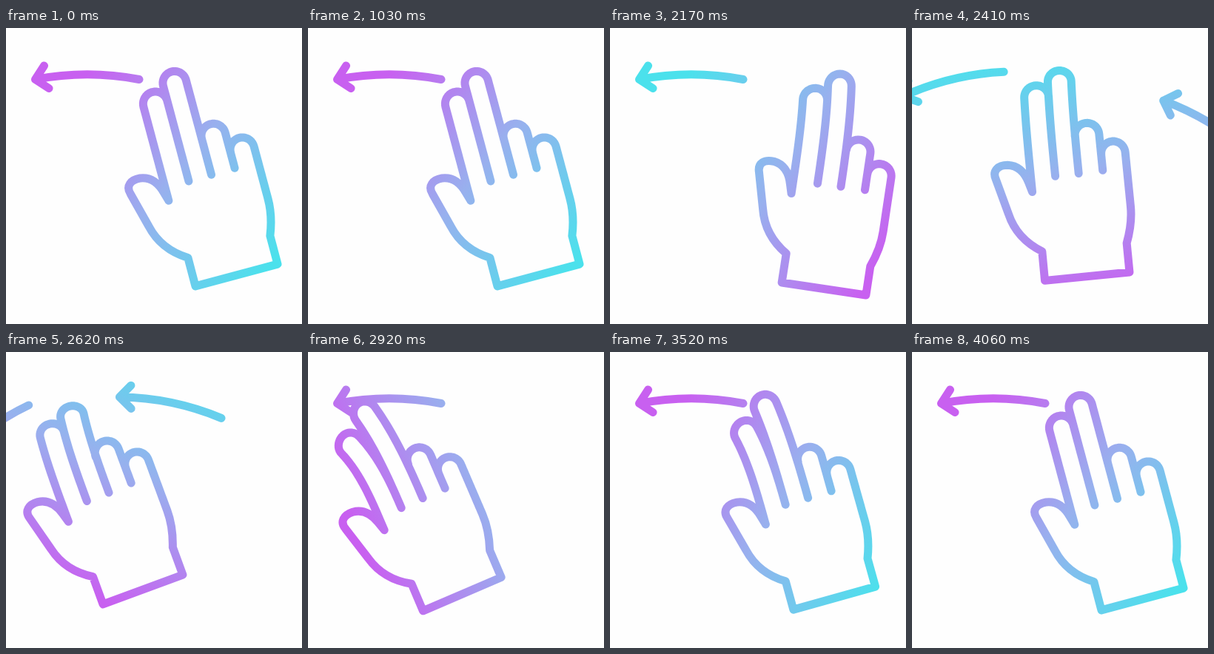
Animation, 400 px wide and 400 px high, one loop 4.09 s. Source, as an HTML page with a canvas:

```html
<!DOCTYPE html>
<html lang="en">
<head>
<meta charset="utf-8">
<title>Swipe left</title>
<style>
html, body { margin: 0; height: 100%; overflow: hidden; background: #fefefe; }
canvas { display: block; width: 100vw; height: 100vh; }
</style>
</head>
<body>
<canvas id="stage" width="400" height="400"></canvas>
<script>
const ctx = document.getElementById('stage').getContext('2d');
const LOOP = 4090, START = 1030, END = 4060, STEP = 30;

// Key poses: time, wrist x, wrist y, tilt, finger curl, extra index curl
const POSES = [
  [START, 311.5, 334, -15, 0, 0],
  [1690, 300.5, 364, 8.1, -20, 0],
  [2170, 289, 352.5, 8.5, -7, 0],
  [2620, 185, 321, -20.3, 10, 0],
  [2760, 176, 324, -23.5, -2, -4],
  [3160, 261, 331, -21.3, -22, -30],
  [3700, 316, 333, -13.5, 0, 0],
  [END, 311.5, 334, -15, 0, 0]
];

const rad = deg => deg * Math.PI / 180;
const lerp = (a, b, u) => a + (b - a) * u;
const progress = (t, from, to) => Math.min(1, Math.max(0, (t - from) / (to - from)));

// Smooth curve through the poses, at rest at both ends
function poseAt(t) {
  let i = 0;
  while (i < POSES.length - 2 && t >= POSES[i + 1][0]) i++;
  const a = POSES[i], b = POSES[i + 1], span = b[0] - a[0];
  const u = progress(t, a[0], b[0]);
  const slope = (j, c) => {
    const p = POSES[j - 1], n = POSES[j + 1];
    return p && n ? (n[c] - p[c]) / (n[0] - p[0]) * span : 0;
  };
  return a.slice(1).map((v, k) => {
    const c = k + 1, d = b[c] - v, m0 = slope(i, c), m1 = slope(i + 1, c);
    return v + u * (m0 + u * (3 * d - 2 * m0 - m1 + u * (m0 + m1 - 2 * d)));
  });
}

// Bend a point above the knuckles; the angle grows with the square of the height
function bend(x, y, curl, length) {
  const base = -130, axis = -29.5;
  const h = Math.max(0, base - y) * length, d = x - axis;
  const a = rad(curl) * (h / 145) ** 2;
  return [
    axis + h * Math.sin(a / 3) + d * Math.cos(a),
    Math.max(base, y) - h * Math.cos(a / 3) + d * Math.sin(a)
  ];
}

function finger(cx, r, top, left, right, curl = 0, length = 1) {
  const pts = [], N = 20;
  for (let i = 0; i < N; i++) pts.push([cx - r, lerp(left, top, i / N)]);
  for (let i = 0; i <= N; i++) {
    const a = Math.PI * (1 + i / N);
    pts.push([cx + r * Math.cos(a), top + r * Math.sin(a)]);
  }
  for (let i = 1; i <= N; i++) pts.push([cx + r, lerp(top, right, i / N)]);
  pts.forEach(([x, y], i) => {
    const p = bend(x, y, curl, length);
    i ? ctx.lineTo(...p) : ctx.moveTo(...p);
  });
}

function hand([x, y, tilt, curl, extra]) {
  const length = 1 - .012 * Math.max(0, curl);
  ctx.save();
  ctx.translate(x, y);
  ctx.rotate(rad(tilt));
  finger(-46, 16.5, -252, -121, -139.5, curl + extra, length);
  finger(-13.6, 15.9, -272.5, -139.5, -140, curl, length);
  finger(18.7, 16.4, -190, -190, -140.5);
  finger(51.5, 16.3, -162, -162, -88.5);
  // palm, wrist and thumb
  ctx.bezierCurveTo(67.8, -73, 64.5, -57, 57.6, -39.5);
  ctx.lineTo(57.5, 0);
  ctx.lineTo(-57.5, 0);
  ctx.lineTo(-57.3, -39.7);
  ctx.bezierCurveTo(-76, -51.4, -91.7, -69, -97.4, -94.4);
  ctx.lineTo(-110, -143.4);
  ctx.bezierCurveTo(-113.5, -155, -105, -161.5, -92.1, -160.3);
  ctx.bezierCurveTo(-79.5, -158.5, -70.3, -149.3, -66.1, -133.7);
  ctx.lineTo(-62.5, -121);
  ctx.restore();
}

function arrow(turn, px, py) {
  ctx.save();
  ctx.translate(px, py);
  ctx.rotate(rad(turn));
  ctx.translate(-px, -py);
  ctx.moveTo(180, 69.5);
  ctx.quadraticCurveTo(110, 56, 39.5, 69.5);
  ctx.moveTo(51.5, 51);
  ctx.lineTo(39.5, 69.5);
  ctx.lineTo(58, 81.5);
  ctx.restore();
}

// One turn of the gradient per loop, quick at first and settling slowly
function tint(t) {
  const turn = 1 - (1 - progress(t, START, END) ** 1.6) ** 2.8;
  const a = rad(39 + 360 * turn), cx = 235, cy = 190, r = 178;
  const dx = r * Math.cos(a), dy = r * Math.sin(a);
  const g = ctx.createLinearGradient(cx - dx, cy - dy, cx + dx, cy + dy);
  ['#c860f0', '#98b0ee', '#4be1ec'].forEach((c, i) => g.addColorStop(i / 2, c));
  return g;
}

function draw(now) {
  const t = Math.max(START, START + Math.floor((now % LOOP - START) / STEP) * STEP);
  const u = progress(t, 2180, 2850), swipe = u * u * (3 - 2 * u);
  ctx.clearRect(0, 0, 400, 400);
  ctx.lineWidth = 11;
  ctx.lineCap = ctx.lineJoin = 'round';
  ctx.strokeStyle = tint(t);
  ctx.beginPath();
  arrow(-50 * swipe, 109, 298);
  arrow(43 * (1 - swipe), 138.5, 620);
  hand(poseAt(t));
  ctx.stroke();
}

const begin = performance.now();
function frame() {
  draw(performance.now() - begin);
  requestAnimationFrame(frame);
}
frame();
</script>
</body>
</html>
```
